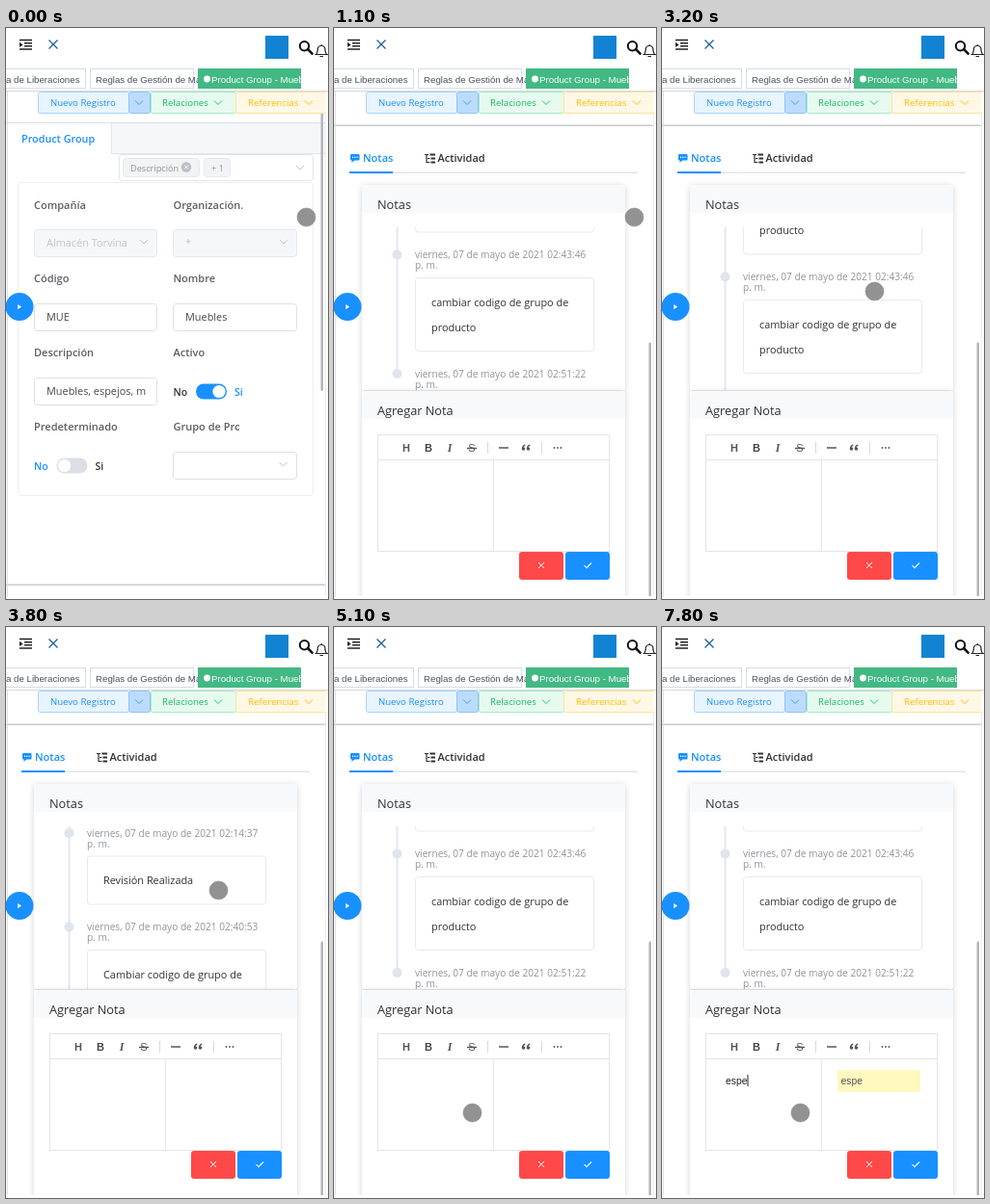
Animation, 334 px wide and 593 px high, one loop 8 s. Source, as an HTML page:

```html
<!DOCTYPE html>
<html lang="es">
<head>
<meta charset="utf-8">
<title>Notas</title>
<style>
html, body { margin: 0; width: 100%; height: 100%; overflow: hidden; background: #fff; }
svg { display: block; }
text { font-family: "Open Sans", "Noto Sans", sans-serif; white-space: pre; }
.arial { font-family: "Liberation Sans", Arial, sans-serif; }
.serif { font-family: "Liberation Serif", Times, serif; font-style: italic; }
</style>
</head>
<body>
<svg id="stage" width="334" height="593" viewBox="0 0 334 593"></svg>
<script>
const BLUE = '#1890ff', DARK = '#303133', GREY = '#909399', LABEL = '#5c5e62',
      LINE = '#e2e5ec', SOFT = '#f5f7fa', HINT = '#c0c4cc';

// Drawing helpers; each returns SVG markup
const text = (x, y, s, size, fill, more = '') =>
  `<text x="${x}" y="${y}" font-size="${size}" fill="${fill}" ${more}>${s}</text>`;
const bold = (x, y, s, size, fill) => text(x, y, s, size, fill, 'font-weight="600"');
const arial = (x, y, s, size, fill, more = '') => text(x, y, s, size, fill, 'class="arial" ' + more);
const fillBox = (x, y, w, h, fill, r = 0, more = '') =>
  `<rect x="${x}" y="${y}" width="${w}" height="${h}" rx="${r}" fill="${fill}" ${more}/>`;
const box = (x, y, w, h, fill, stroke = LINE, r = 3) =>
  fillBox(x + .5, y + .5, w - 1, h - 1, fill, r, `stroke="${stroke}"`);
const path = (d, stroke, width = 1, more = '') =>
  `<path d="${d}" fill="none" stroke="${stroke}" stroke-width="${width}" ${more}/>`;
const dot = (x, y, r, fill) => `<circle cx="${x}" cy="${y}" r="${r}" fill="${fill}"/>`;
const chevron = (x, y, color) => path(`M${x - 4} ${y - 2}l4 4l4-4`, color);
const cross = (x, y, r, color, width) =>
  path(`M${x - r} ${y - r}l${2 * r} ${2 * r}m0 ${-2 * r}l${-2 * r} ${2 * r}`, color, width);
const clip = (id, x, y, w, h) =>
  `<clipPath id="${id}"><rect x="${x}" y="${y}" width="${w}" height="${h}"/></clipPath>`;
const clipped = (id, s) => `<g clip-path="url(#${id})">${s}</g>`;

const header = () =>
  fillBox(0, 0, 334, 66, '#fff') +
  path('M14 12.5h13M19 15.8h8M19 18.8h8M14 22h13', '#222', 1.5) +
  '<path d="M14 14.8l3.6 2.6l-3.6 2.6z" fill="#222"/>' +
  cross(49, 17, 4.5, '#1d5c98', 1.3) +
  fillBox(269, 8, 24, 24, '#1283d3') +
  path('M313 22l4.5 4.7', '#111', 2.6, 'stroke-linecap="round"') +
  '<circle cx="309.5" cy="18.8" r="4.7" fill="none" stroke="#111" stroke-width="2"/>' +
  path('M320.5 27.5h13.5M322 27c1.4-2 1.2-3 1.4-5.5c.5-4 7-4 7.5 0c.2 2.5 0 3.5 1.4 5.5M325.5 29.5h3.5M327.2 18.5v-1.5', '#222', 1.2) +
  box(-4, 42, 87, 21, '#fff', '#d8dce5', 0) +
  arial(0, 57, 'a de Liberaciones', 9.7, '#495060') +
  box(87, 42, 108, 21, '#fff', '#d8dce5', 0) +
  clipped('tab2', arial(93, 57, 'Reglas de Gestión de Materiales', 9.7, '#495060')) +
  fillBox(199, 42, 107, 21, '#42b983') +
  dot(208.5, 53, 3.4, '#fff') +
  clipped('tab3', arial(213, 57, 'Product Group - Muebles', 9.7, '#fff')) +
  fillBox(0, 65, 334, 1, '#d5d9e1');

const actions = () =>
  box(33, 66, 95, 23, '#e8f4ff', '#a3d3ff', 2) +
  text(46, 80.7, 'Nuevo Registro', 9.6, BLUE) +
  box(127, 66, 23, 23, '#bcdcff', '#8cc4fb', 2) + chevron(138, 77.5, '#4a9bea') +
  box(150, 66, 89, 23, '#e7faf0', '#a1ebc2', 2) +
  text(162, 80.7, 'Relaciones', 9.65, '#13b85c') + chevron(220, 77.5, '#13ce66') +
  box(238, 66, 100, 23, '#fff8e6', '#ffe399', 2) +
  text(251, 80.7, 'Referencias', 9.7, '#ffba00') + chevron(314, 77.5, '#ffba00') +
  fillBox(332, 66, 2, 26, '#fff');

const label = (x, y, s) => bold(x, y, s, 11, LABEL);
const field = (x, y, s = '', off = false) =>
  box(x, y, x < 100 ? 128 : 129, 29, off ? SOFT : '#fff', off ? '#e4e7ed' : '#dcdfe6') +
  clipped(x < 100 ? 'colA' : 'colB', text(x + 13, y + 18, s, 10.9, off ? HINT : '#45474b'));
const toggle = (x, y, on) =>
  bold(x, y + 4, 'No', 10.5, on ? DARK : BLUE) +
  fillBox(x + 23.5, y - 8, 32, 16, on ? BLUE : '#dcdfe6', 8) +
  dot(x + (on ? 47.5 : 31.5), y, 6.6, '#fff') +
  bold(x + 63.5, y + 4, 'Si', 10.5, on ? BLUE : DARK);

const form = () =>
  fillBox(0, 98, 332, 32, SOFT) + fillBox(0, 98, 332, 1, '#dcdfe6') +
  fillBox(0, 99, 110, 32, '#fff') + fillBox(109, 99, 1, 32, '#e0e3ea') +
  fillBox(110, 130, 222, 1, LINE) +
  bold(16, 119, 'Product Group', 10.8, BLUE) +
  box(117, 131, 202, 28, '#fff') +
  box(121, 135, 80, 20, '#f2f3f5', '#e9e9eb') + text(129, 148.5, 'Descripción', 9.2, GREY) +
  dot(187, 144.5, 5.2, '#bcbfc6') + cross(187, 144.5, 1.9, '#fff', 1) +
  box(205, 135, 28, 20, '#f2f3f5', '#e9e9eb') + text(213, 148.5, '+ 1', 9.2, GREY) +
  chevron(305, 145, HINT) +
  box(12, 160, 307, 326, 'none', '#ebeef5') +
  label(29, 188, 'Compañía') + label(173.5, 188, 'Organización.') +
  field(29, 209, 'Almacén Torvina', true) + chevron(143, 222, HINT) +
  field(173, 209, '*', true) + chevron(288, 222, HINT) +
  label(29, 264, 'Código') + label(173.5, 264, 'Nombre') +
  field(29, 286, 'MUE') + field(173, 286, 'Muebles') +
  label(29, 341, 'Descripción') + label(173.5, 341, 'Activo') +
  field(29, 363, 'Muebles, espejos, mesas') + toggle(173.5, 377.5, true) +
  label(29, 418, 'Predeterminado') + clipped('group', label(173.5, 418, 'Grupo de Producto')) +
  toggle(29, 454.5, false) + field(173, 440) + chevron(287.5, 453, HINT);

// Timeline: centre of each date, time, lines of the note
const notes = [
  [214, '02:14:37', ['Revisión Realizada']],
  [311.5, '02:40:53', ['Cambiar codigo de grupo de', 'producto']],
  [435, '02:43:46', ['cambiar codigo de grupo de', 'producto']],
  [558.5, '02:51:22', []]
];
const note = ([y, time, lines]) =>
  dot(65.5, y, 5, '#dfe4ed') +
  text(84, y + 3.5, 'viernes, 07 de mayo de 2021 ' + time, 10.15, GREY) +
  text(84, y + 14.5, 'p. m.', 10.15, GREY) +
  (lines.length ? box(84, y + 23.5, 186, 25 + 26 * lines.length, '#fff', '#e6e9f0') : '') +
  lines.map((s, i) => text(101, y + 53 + 26 * i, s, 10.9, DARK)).join('');

const card = (y, h, title) =>
  fillBox(29, y, 273, h, '#fff', 2, 'style="filter:drop-shadow(0 1px 3px rgba(0,0,0,.17))"') +
  fillBox(29, y, 273, 29, '#f8f9fb', 2) +
  text(45, y + 25, title, 12.75, DARK);

const toolbar = () => {
  const ink = '#555', mid = 'text-anchor="middle"', strong = mid + ' font-weight="bold"';
  return arial(75, 440, 'H', 11, ink, strong) +
    arial(98, 440, 'B', 11, '#444', strong) +
    text(120, 440, 'I', 12, ink, 'class="serif" ' + strong) +
    arial(143, 440, 'S', 11, ink, mid) +
    path('M138 436.5h10M171 436h10', ink, 1.3) +
    path('M159.5 430v12M215.5 430v12', '#d9d9d9') +
    [195.5, 200.5].map(x => dot(x + 1, 437, 1.8, ink) + path(`M${x} 437q0-3 2.8-3.8`, ink, 1.2)).join('') +
    [228.5, 232, 235.5].map(x => dot(x, 436, .9, ink)).join('');
};

const lower = () =>
  fillBox(0, 100, 332, 1, '#e3e3e6') + fillBox(0, 101, 332, 1, '#c9cbd0') +
  fillBox(17, 131, 9.5, 6.5, BLUE, 1) + `<path d="M18.5 137v3l3-3z" fill="${BLUE}"/>` +
  [19.5, 21.8, 24.1].map(x => dot(x, 134.2, .7, '#fff')).join('') +
  bold(30, 139, 'Notas', 11, BLUE) +
  path('M94 131.5h4M97 135.5h2.5M97 139.5h2.5M96 131.5v8h2', DARK, 1.2) +
  path('M99.5 131.5h5.5M100.5 135.5h4.5M100.5 139.5h4.5', DARK, 2) +
  bold(107.5, 139, 'Actividad', 11, DARK) +
  fillBox(16, 149.5, 299, 1.5, LINE) + fillBox(16, 149, 45, 2, BLUE) +
  card(163, 213, 'Notas') +
  clipped('listArea', `<g id="list">${fillBox(64.5, 207, 2, 352, '#e4e7ed')}${notes.map(note).join('')}</g>`) +
  card(377, 230, 'Agregar Nota') +
  fillBox(45.5, 422.5, 240, 121, '#fff', 0, 'stroke="#e5e5e5"') +
  path('M45 448.5h241M165.5 448v96', '#e5e5e5') + toolbar() +
  fillBox(192, 544, 46, 29, '#ff4949', 3) + cross(215, 558, 3, '#fff', 1) +
  fillBox(240, 544, 46, 29, BLUE, 3) + path('M259.5 558l2.5 2.7l5-5.2', '#fff', 1.1) +
  `<g id="preview">${fillBox(182, 460, 86, 23, '#fff8bf', 2)}${arial(185.5, 475, '', 10.4, '#555', 'id="echo"')}</g>` +
  arial(66, 475, '', 10.4, '#222', 'id="typed"') +
  fillBox(66, 465, 1, 12, '#222', 0, 'id="caret"');

const stage = document.getElementById('stage');
stage.innerHTML =
  '<defs>' + clip('view', 0, 66, 334, 524) + clip('listArea', 45, 207, 252, 169) +
  clip('tab2', 87, 42, 112, 21) + clip('tab3', 199, 42, 107, 21) +
  clip('colA', 29, 200, 116, 250) + clip('colB', 173, 200, 129, 280) +
  clip('group', 173, 405, 69, 20) + '</defs>' +
  clipped('view',
    `<g id="page">${form()}<g transform="translate(0 477)">${lower()}</g></g>` +
    fillBox(1, 66, 1, 524, '#dfe1e6') + fillBox(331, 66, 1, 524, '#eceef2') +
    fillBox(326.5, 69, 2.5, 308, '#b4b6ba', 1.2, 'id="thumb"') +
    dot(14, 289.5, 14.5, BLUE) + '<path d="M12.2 287l3.8 2.6l-3.8 2.6z" fill="#fff"/>') +
  actions() + header() +
  '<circle id="pointer" r="9.5" fill="#929292" stroke="#888" stroke-width=".6"/>';

const el = id => document.getElementById(id);
const page = el('page'), list = el('list'), thumb = el('thumb'), pointer = el('pointer'),
      typed = el('typed'), echo = el('echo'), preview = el('preview'), caret = el('caret');

// Value of a [time, value] track at time t
function at(track, t) {
  const i = track.findIndex(k => k[0] > t);
  if (i < 0) return track[track.length - 1][1];
  if (!i) return track[0][1];
  const [t0, a] = track[i - 1], [t1, b] = track[i];
  return a + (b - a) * (t - t0) / (t1 - t0);
}
const ease = u => { u = Math.min(1, Math.max(0, u)); return u * u * (3 - 2 * u); };

const pageTrack = [[400, 0], [500, 38], [600, 125], [700, 221], [800, 312], [900, 390], [1000, 448], [1100, 477]];
const listTrack = [[3100, 199.5], [3200, 176.5], [3400, 102], [3600, 32], [3700, 9], [3800, 0],
  [3900, 20], [4000, 58], [4200, 145], [4300, 182], [4400, 199.5]];
const keys = [6900, 7300, 7600, 7800];
const advance = [0, 5.8, 11, 16.8, 22.5];

function draw(now) {
  const t = Math.floor(now % 8000 / 100) * 100;
  const y = at(pageTrack, t);
  page.setAttribute('transform', `translate(0 ${-Math.round(y)})`);
  thumb.setAttribute('y', 69 + y * .54);
  list.setAttribute('transform', `translate(0 ${-at(listTrack, t)})`);

  const a = ease((t - 1300) / 700), b = ease((t - 4700) / 400);
  pointer.setAttribute('cx', 311.5 - 91 * a - 77 * b);
  pointer.setAttribute('cy', 196.5 + 77 * a + 231 * b);

  const n = keys.filter(k => t >= k).length;
  typed.textContent = echo.textContent = 'espe'.slice(0, n);
  preview.style.display = t >= 7000 ? '' : 'none';
  caret.setAttribute('x', 66 + advance[n]);
  caret.style.display = t >= 5400 && !(t >= 5900 && t < 6400) ? '' : 'none';
}

const start = performance.now();
function tick() {
  draw(performance.now() - start);
  requestAnimationFrame(tick);
}
tick();
</script>
</body>
</html>
```
